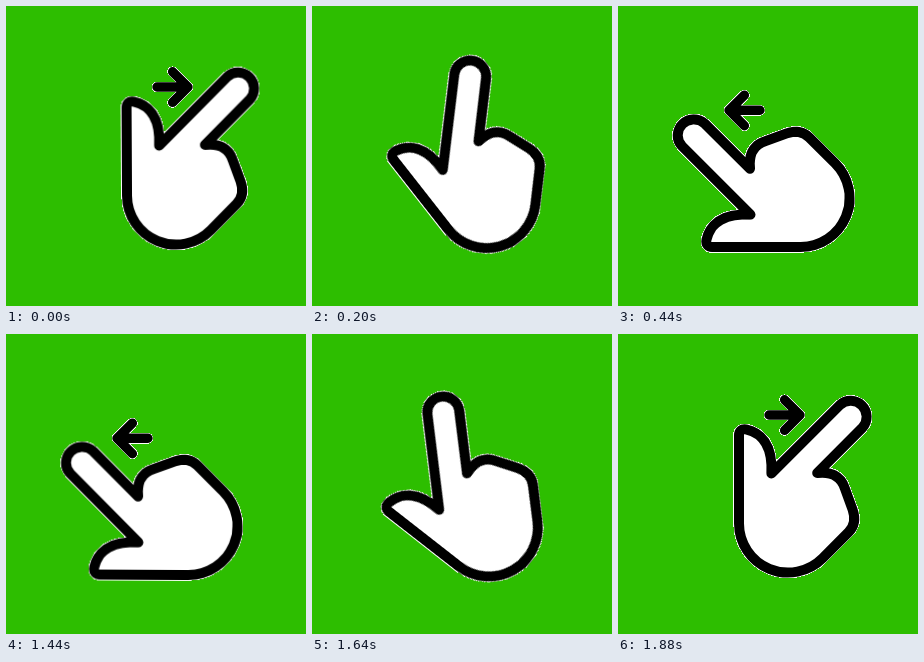
Animation, 300 px wide and 300 px high, one loop 2880 ms. Source, as an HTML page without scripts:

```html
<!DOCTYPE html>
<html lang="en">
<head>
<meta charset="utf-8">
<title>Swipe hand</title>
<style>
html, body { margin: 0; height: 100%; overflow: hidden; background: #2dbe00; }
svg { display: block; width: 100%; height: 100%; }

.shape { stroke-linecap: round; stroke-linejoin: round; }
.edge { stroke: #fff; stroke-width: 11.5; shape-rendering: crispEdges; }
.ink { stroke: #000; stroke-width: 10; }
.arrow { fill: none; }
.arrow .edge { stroke-width: 10.8; }
.arrow .ink { stroke-width: 9.4; }

.hand, .arrow { animation: 2880ms step-end infinite; }
.hand { fill: #fff; transform-origin: 177.5px 184.5px; animation-name: swing; }
.right { animation-name: right; }
.left { animation-name: left; }

/* A steep ease in and out, held for 40 ms per pose */
@keyframes swing {
  0% { transform: rotate(-.3deg); }
  1.38% { transform: rotate(-1.2deg); }
  2.77% { transform: rotate(-3.1deg); }
  4.16% { transform: rotate(-6.6deg); }
  5.55% { transform: rotate(-13.6deg); }
  6.94% { transform: rotate(-38.1deg); }
  8.33% { transform: rotate(-74.9deg); }
  9.72% { transform: rotate(-82.9deg); }
  11.11% { transform: rotate(-86.7deg); }
  12.5% { transform: rotate(-88.7deg); }
  13.88% { transform: rotate(-89.7deg); }
  15.27% { transform: rotate(-90deg); }
  50% { transform: rotate(-89.7deg); }
  51.38% { transform: rotate(-88.8deg); }
  52.77% { transform: rotate(-86.9deg); }
  54.16% { transform: rotate(-83.4deg); }
  55.55% { transform: rotate(-76.4deg); }
  56.94% { transform: rotate(-52deg); }
  58.33% { transform: rotate(-15.1deg); }
  59.72% { transform: rotate(-7.1deg); }
  61.11% { transform: rotate(-3.3deg); }
  62.5% { transform: rotate(-1.3deg); }
  63.88% { transform: rotate(-.3deg); }
  65.27%, 100% { transform: rotate(0deg); }
}
@keyframes right {
  0% { visibility: visible; }
  5.55% { visibility: hidden; }
  59.72%, 100% { visibility: visible; }
}
@keyframes left {
  0% { visibility: hidden; }
  9.72% { visibility: visible; }
  55.55%, 100% { visibility: hidden; }
}
</style>
</head>
<body>
<svg viewBox="0 0 300 300">
  <defs>
    <path id="hand" d="M121 189.5V101.3Q121 94.6 128 95.4C142 98.4 155 109.4 153.4 139.5L221.9 71A16 16 0 0 1 244.5 93.6L199.2 139C212.4 137.4 222.6 141.6 226.6 153.6L234.6 175.6Q239.4 189.4 230.4 198.4L204.6 224.2A49 49 0 0 1 121 189.5Z"/>
    <path id="arrow" d="M151 81H182M166.6 65.8L182 81L166.6 96.4"/>
  </defs>
  <g class="shape arrow right">
    <use href="#arrow" class="edge"/>
    <use href="#arrow" class="ink"/>
  </g>
  <g class="shape arrow left">
    <g transform="matrix(-1 0 0 1 293 23.3)">
      <use href="#arrow" class="edge"/>
      <use href="#arrow" class="ink"/>
    </g>
  </g>
  <g class="shape hand">
    <use href="#hand" class="edge"/>
    <use href="#hand" class="ink"/>
  </g>
</svg>
</body>
</html>
```
